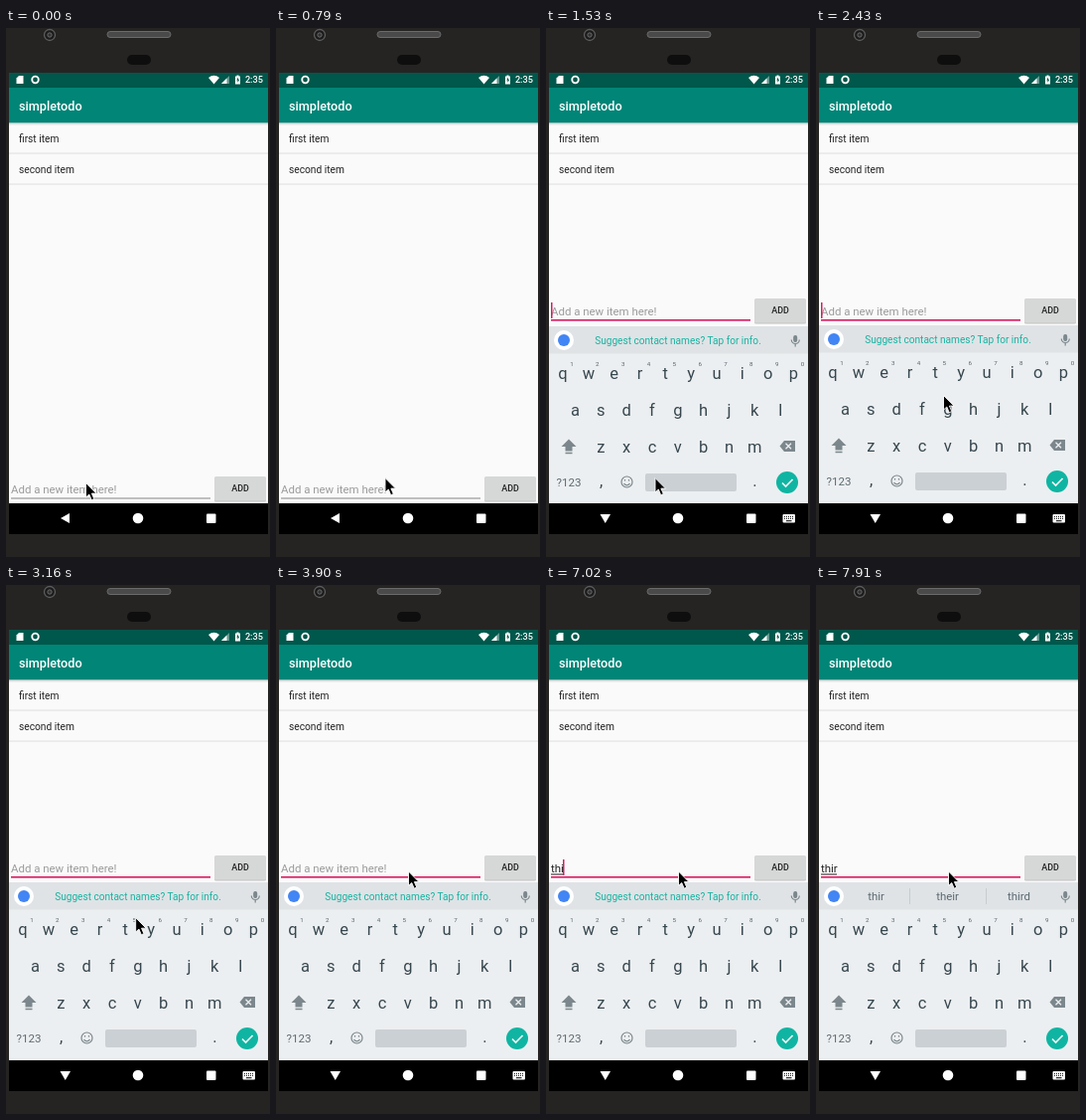
Write an HTML page that moves like this. It is 266 px wide and 532 px high and loops after 8 s.

```html
<!DOCTYPE html>
<html lang="en">
<head>
<meta charset="utf-8">
<title>To-do list</title>
<style>
html, body { margin: 0; height: 100%; overflow: hidden; background: #252423; }
svg { display: block; width: 100vw; height: 100vh; font-family: Roboto, sans-serif; }
.mid { text-anchor: middle; }
.med { font-weight: 500; }
.item { font-size: 10.2px; fill: #212121; }
.field { font-size: 11.43px; }
.key { font-size: 16.5px; fill: #37474f; text-anchor: middle; }
.digit { font-size: 6.2px; fill: #56646b; text-anchor: middle; }
.sym { font-size: 11.5px; fill: #5c6a71; text-anchor: middle; }
.word { font-size: 11.4px; fill: #5c6a71; text-anchor: middle; }
</style>
</head>
<body>
<svg viewBox="0 0 266 532">
  <!-- phone -->
  <rect width="266" height="532" fill="#252423"/>
  <circle cx="44" cy="7" r="5.5" fill="#1b1b1b" stroke="#5d5d5d" stroke-width="1.3"/>
  <circle cx="44" cy="7" r="2.2" fill="#333" stroke="#777" stroke-width=".8"/>
  <rect x="102" y="3.5" width="64" height="6" rx="3" fill="#4a4a4a" stroke="#6b6b6b"/>
  <rect x="122" y="27" width="24" height="10" rx="5" fill="#0f0e0e"/>

  <!-- app -->
  <rect x="3" y="45" width="261" height="433" fill="#fafafa"/>
  <rect x="3" y="45" width="261" height="15" fill="#00574b"/>
  <rect x="3" y="60" width="261" height="35.5" fill="#008577"/>
  <rect x="3" y="95.5" width="261" height="1" fill="#bfc4c3"/>
  <rect x="3" y="96.5" width="261" height="1" fill="#e6e7e7"/>
  <g fill="#fff">
    <path d="M13 48h4.5v8h-7v-5.5z"/>
    <circle cx="29.500" cy="52" r="3.3" fill="none" stroke="#fff" stroke-width="1.8"/>
    <path d="M204 50q5.500-4.500 11 0l-5.500 6.500z"/>
    <path d="M225 48v8h-8z" opacity=".4"/>
    <path d="M222.500 50.500v5.500h-5.500z"/>
    <path d="M232.500 47.500h2v1h1.500v8h-5v-8h1.500z"/>
    <path d="M234 49.500l-1.800 3h1.200v2.500l1.800-3.200h-1.200z" fill="#00574b"/>
    <text x="259" y="55.300" font-size="9.200" text-anchor="end" class="med">2:35</text>
    <text x="13" y="82.500" font-size="12.700" class="med">simpletodo</text>
  </g>
  <text class="item" x="13" y="114.500">first item</text>
  <text class="item" x="13" y="145.700">second item</text>
  <path d="M3 126h261M3 157h261" stroke="#dedede"/>

  <!-- input row, placed for the open keyboard -->
  <g id="row">
    <text id="hint" class="field" x="5" y="289" fill="#9b9b9b">Add a new item here!</text>
    <text id="typed" class="field" x="5" y="289" fill="#212121"></text>
    <rect id="under" x="5" y="290.500" height="1" fill="#212121"/>
    <rect id="line" x="5" width="201"/>
    <rect id="caret" y="276" width="1.500" height="16" fill="#d81b60"/>
    <rect x="210" y="273" width="52" height="24.500" rx="1.500" fill="#c3c4c4"/>
    <rect x="210" y="272" width="52" height="24.500" rx="1.500" fill="#d6d7d7"/>
    <text x="236" y="287.300" font-size="8.900" class="mid med" fill="#212121">ADD</text>
  </g>

  <!-- keyboard -->
  <g id="board">
    <rect x="3" y="299" width="261" height="181" fill="#eceff1"/>
    <rect x="3" y="299" width="261" height="27.500" fill="#dfe3e6"/>
    <circle cx="18" cy="313" r="10" fill="#fff"/>
    <circle cx="18" cy="313" r="6" fill="#4285f4"/>
    <text id="tip" x="133" y="317" font-size="10.100" class="mid" fill="#18b3a1">Suggest contact names? Tap for info.</text>
    <g id="words">
      <path d="M94.500 305v16M171.500 305v16" stroke="#c6cccf"/>
      <text class="word" x="60.500" y="317.300">thir</text>
      <text class="word" x="132.500" y="317.300">their</text>
      <text class="word" x="204.500" y="317.300">third</text>
    </g>
    <g fill="none" stroke="#7b878c" stroke-width="1.200">
      <rect x="249.800" y="308.500" width="2.800" height="6" rx="1.400" fill="#7b878c"/>
      <path d="M247.300 312.500a4 4 0 0 0 8 0M251.200 316.500v3"/>
      <circle cx="81.500" cy="455.500" r="5.500"/>
      <path d="M78.500 457a3.400 3.400 0 0 0 6 0M79.500 453v1.500M83.500 453v1.500"/>
    </g>
    <g id="keys"></g>
    <path d="M23 412.500l7.500 7.500h-4v4.500h-7v-4.500h-4zM19.500 425.800h7v1.500h-7z" fill="#7b878c"/>
    <path d="M240 414h11v11h-11l-4.500-5.500z" fill="#7b878c"/>
    <path d="M241.500 416.700l5.500 5.600m0-5.600l-5.500 5.600" stroke="#eceff1" stroke-width="1.300"/>
    <rect x="100" y="447" width="92" height="18" rx="2" fill="#cbd0d4"/>
    <text class="sym" x="23" y="460">?123</text>
    <text class="key" x="55.500" y="460">,</text>
    <text class="key" x="210.500" y="460">.</text>
    <circle cx="243" cy="456" r="11" fill="#0fb5a2"/>
    <path d="M238 456.500l3.500 3.500 7-7" fill="none" stroke="#fff" stroke-width="1.600"/>
  </g>

  <!-- navigation -->
  <rect x="3" y="478" width="261" height="31" fill="#000"/>
  <g fill="#fff">
    <path id="back" d="M55 493l9-5v10z"/>
    <path id="down" d="M54.500 489h10.500l-5.250 9z"/>
    <circle cx="133" cy="493" r="5.300"/>
    <rect x="202" y="488.500" width="9.500" height="9.500" rx="1"/>
    <g id="switch">
      <rect x="238.500" y="489" width="12.500" height="8.500" rx="1"/>
      <path d="M240 491.300h10M240 493.300h10" stroke="#000" stroke-dasharray="1 1"/>
      <path d="M242 495.700h5.500" stroke="#000"/>
    </g>
  </g>

  <path id="mouse" d="M0 0v14.500l3.300-3 2.400 5.700 2.600-1.100-2.400-5.500h4.600z" fill="#000" stroke="#fff" stroke-width=".9"/>
</svg>
<script>
const $ = id => document.getElementById(id);
const LOOP = 8000;

// Keyboard letters
let keys = "";
const addRow = (letters, x0, y, digits) => [...letters].forEach((c, i) => {
  const x = x0 + i * 25.83;
  keys += `<text class="key" x="${x}" y="${y}">${c}</text>`;
  if (digits) keys += `<text class="digit" x="${x + 9}" y="338.500">${(i + 1) % 10}</text>`;
});
addRow("qwertyuiop", 17, 352.3, true);
addRow("asdfghjkl", 29.5, 389.3);
addRow("zxcvbnm", 55.3, 425.7);
$("keys").innerHTML = keys;

// Pointer moves: [first step, last step, step count, x, y]
const START = [80.5, 457.5];
const MOVES = [
  [500, 790, 3, 110, 452.5],
  [2130, 2430, 3, 128.5, 369.5],
  [2730, 3600, 7, 133.5, 288],
];
// Times at which the caret turns on or off
const BLINKS = [1090, 1830, 2280, 2730, 3300, 3900, 4340, 4790, 5390, 5830, 5980, 6570, 7020, 7910];
const TYPING = [5980, 6130, 7020, 7460];
const CARET_X = [5, 9, 14, 17, 21];

const passed = (times, t) => times.filter(at => t >= at).length;
const show = (id, on) => $(id).setAttribute("visibility", on ? "visible" : "hidden");
const set = (id, attrs) => {
  for (const k in attrs) $(id).setAttribute(k, attrs[k]);
};
const shift = (id, x, y) => set(id, { transform: `translate(${x} ${y})` });

function pointer(t) {
  let [x, y] = START;
  for (const [from, to, n, nx, ny] of MOVES) {
    if (t < from) break;
    const gap = (to - from) / (n - 1);
    const p = Math.min(1, (Math.floor((t - from) / gap + 0.01) + 1) / n);
    x += (nx - x) * p;
    y += (ny - y) * p;
  }
  return [x, y];
}

function draw(t) {
  const focused = t >= 1090, open = t >= 1530, count = passed(TYPING, t);

  shift("row", 0, open ? 0 : 179);
  set("line", focused ? { y: 293, height: 1.6, fill: "#d81b60" } : { y: 293.5, height: 1, fill: "#858585" });
  show("hint", !count);
  $("typed").textContent = "thir".slice(0, count);
  set("under", { width: CARET_X[count] - 5 });
  set("caret", { x: CARET_X[count] });
  show("caret", passed(BLINKS, t) % 2);

  show("board", open);
  shift("board", 0, t < 1680 ? 1 : 0);
  $("tip").style.display = count < 4 ? "" : "none";
  $("words").style.display = count < 4 ? "none" : "";

  show("back", t < 1390);
  show("down", t >= 1390);
  show("switch", t >= 1390);
  shift("mouse", ...pointer(t));
}

function tick() {
  draw(performance.now() % LOOP);
  requestAnimationFrame(tick);
}
tick();
</script>
</body>
</html>
```
